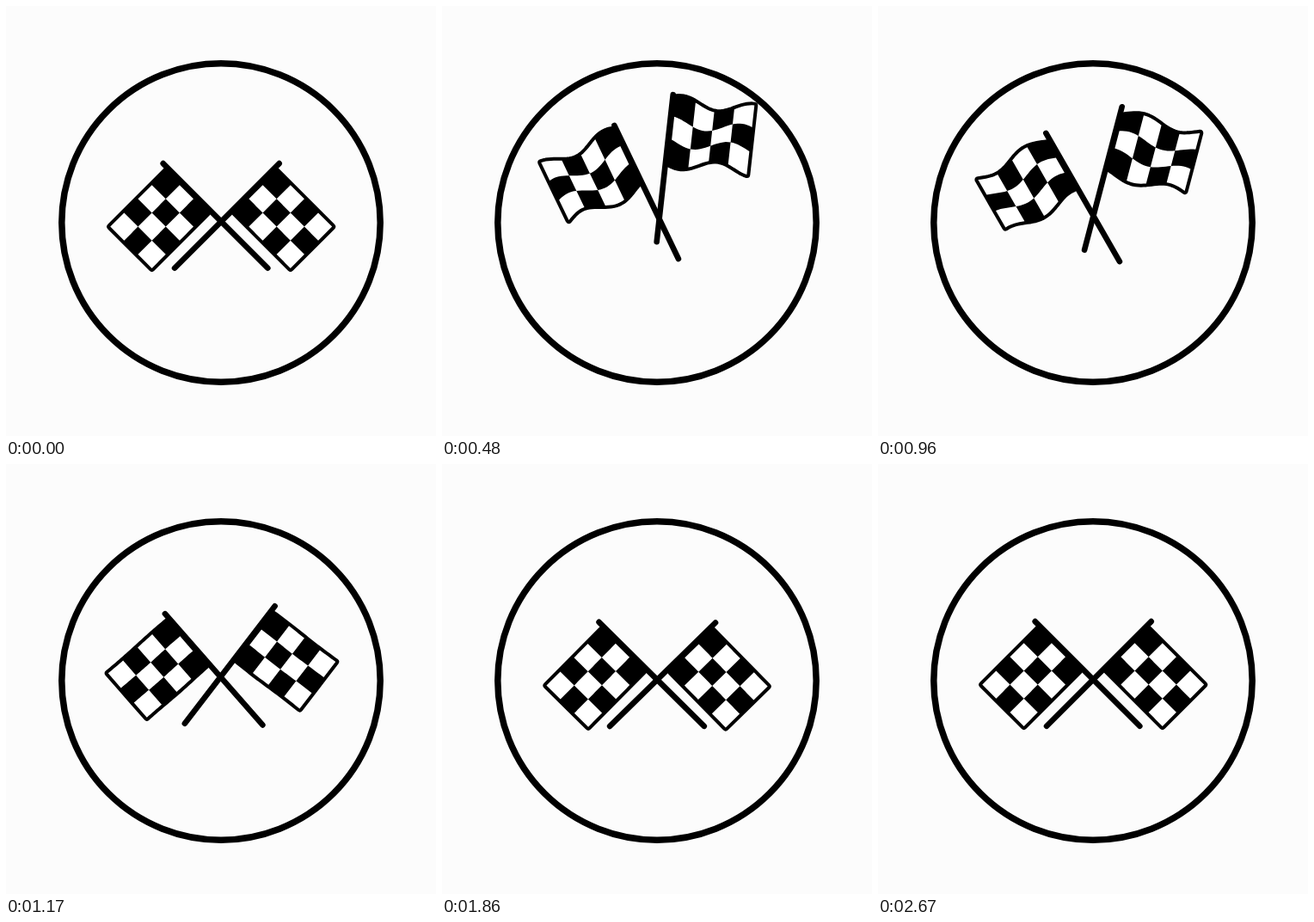
Animation of 500 by 500 pixels, one loop 2.73 s. Source, as an HTML page with a canvas:

```html
<!DOCTYPE html>
<html lang="en">
<head>
<meta charset="utf-8">
<title>Crossed flags</title>
<style>
  html, body { margin: 0; width: 100%; height: 100%; overflow: hidden; background: #fcfcfc; }
  canvas { display: block; width: 500px; height: 500px; }
</style>
</head>
<body>
<canvas id="stage" width="500" height="500"></canvas>
<script>
const ctx = document.getElementById('stage').getContext('2d');
const LOOP = 2730, STEP = 30;
const CELL = 22.8, COLS = 4, ROWS = 3;
const POLE = 172, LIFT = 38.8, LAND = 1214;
const WAVE = 84, SPEED = 0.385;

const clamp = x => Math.max(0, Math.min(1, x));
const ramp = (t, a, b) => clamp((t - a) / (b - a));
const smooth = x => x * x * (3 - 2 * x);

// Degrees of lift: quick rise, accelerating fall, damped settling.
function liftAt(t) {
  if (t < 575) return LIFT * (1 - (1 - ramp(t, 40, 510)) ** 2);
  if (t < LAND) return LIFT * (1 - ramp(t, 575, LAND) ** 3);
  const s = t - LAND;
  return -8.2 * Math.exp(-0.0038 * s) * Math.sin(2 * Math.PI * s / 480);
}

const swellAt = t => 6.6 * smooth(ramp(t, 40, 230)) * (1 - smooth(ramp(t, 860, LAND)));

// Path of a block of cells, bent by the wave along its upper and lower edges.
function block(col, row, cols, rows, bend) {
  const n = cols * 8;
  ctx.beginPath();
  for (let i = 0; i <= n; i++) {
    const x = (col + cols * i / n) * CELL, y = row * CELL;
    ctx.lineTo(x, y + bend(x, y));
  }
  for (let j = 1; j < rows; j++) {
    const x = (col + cols) * CELL, y = (row + j) * CELL;
    ctx.lineTo(x, y + bend(x, y));
  }
  for (let i = n; i >= 0; i--) {
    const x = (col + cols * i / n) * CELL, y = (row + rows) * CELL;
    ctx.lineTo(x, y + bend(x, y));
  }
  ctx.closePath();
}

function flag(side, lift, swell, crest, lead) {
  const bend = (x, y) =>
    swell * Math.cos(2 * Math.PI * (x - crest + lead * y / (ROWS * CELL)) / WAVE);

  ctx.save();
  ctx.translate(250.2, 0);
  ctx.scale(side, 1);
  ctx.translate(-71, 213);
  ctx.rotate(-lift * Math.PI / 180);
  ctx.translate(138.5, -29.9);
  ctx.rotate(Math.PI / 4);

  ctx.lineCap = ctx.lineJoin = 'round';
  ctx.strokeStyle = ctx.fillStyle = '#000';
  ctx.lineWidth = 6.6;
  ctx.beginPath();
  ctx.moveTo(0, 0);
  ctx.lineTo(0, POLE);
  ctx.stroke();

  ctx.translate(4.2, 8.5);
  ctx.lineWidth = 8;
  block(0, 0, COLS, ROWS, bend);
  ctx.fill();
  ctx.stroke();

  ctx.fillStyle = '#fff';
  for (let c = 0; c < COLS; c++) {
    for (let r = 0; r < ROWS; r++) {
      if ((c + r) % 2) {
        block(c, r, 1, 1, bend);
        ctx.fill();
      }
    }
  }
  ctx.restore();
}

function draw(t) {
  ctx.fillStyle = '#fcfcfc';
  ctx.fillRect(0, 0, 500, 500);
  ctx.strokeStyle = '#000';
  ctx.lineWidth = 7.5;
  ctx.beginPath();
  ctx.arc(250, 252, 185.2, 0, 2 * Math.PI);
  ctx.stroke();

  const lift = liftAt(t), swell = swellAt(t), run = SPEED * (t - 240);
  flag(-1, lift / 2, swell, 43 + run, 22);
  flag(1, lift, swell, 40 + run, 35);
}

const start = performance.now();
function tick() {
  const t = (performance.now() - start) % LOOP;
  const held = Math.floor(t / STEP) * STEP;
  draw(held < 60 ? 0 : held);
  requestAnimationFrame(tick);
}
tick();
</script>
</body>
</html>
```
